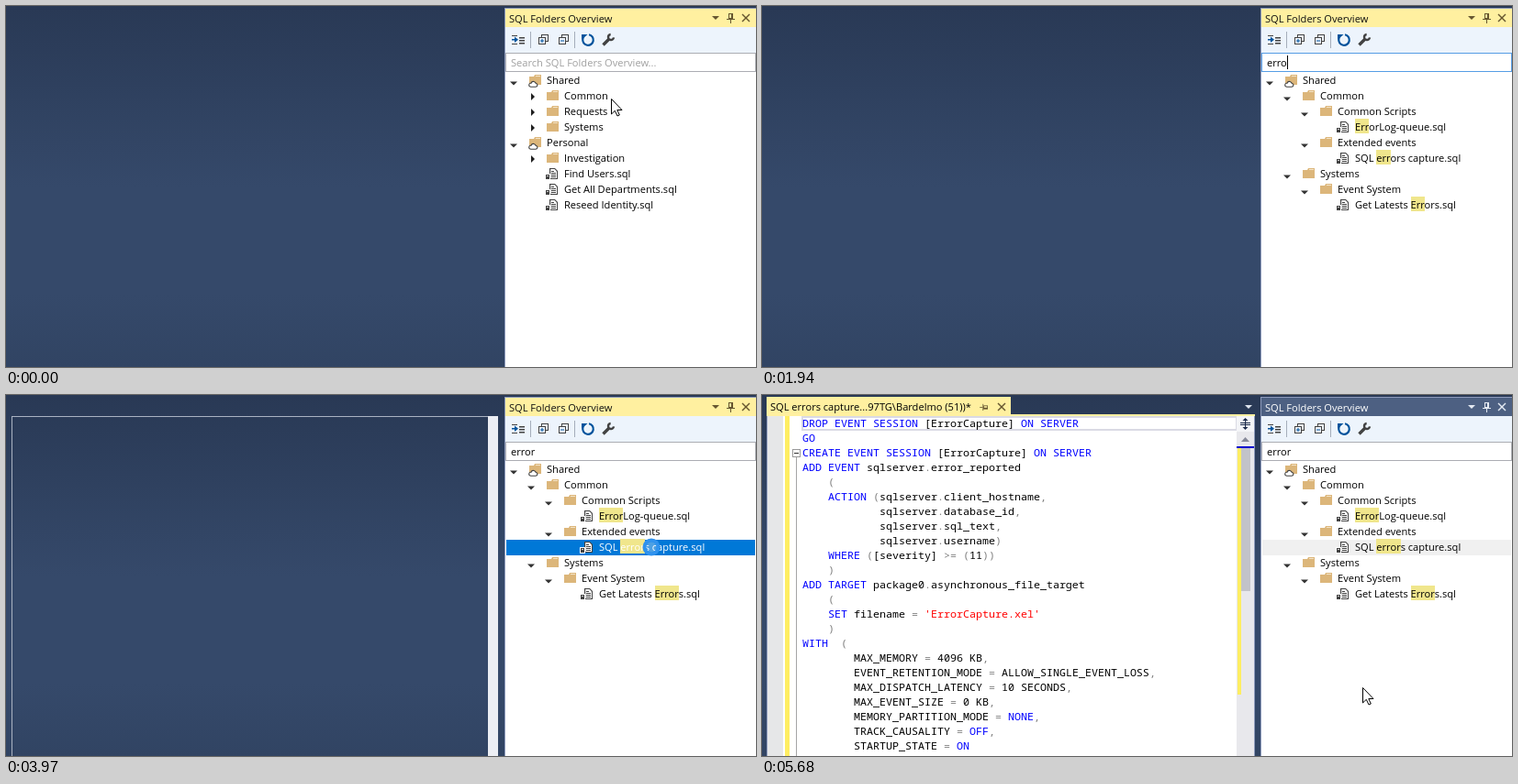
An HTML page with a canvas for the animation above (5.76 s loop, 817 px wide and 394 px high).

```html
<!DOCTYPE html>
<html lang="en">
<head>
<meta charset="utf-8">
<title>Script tree search</title>
<style>
html, body { margin: 0; width: 100%; height: 100%; overflow: hidden; background: #35496a; }
canvas { display: block; }
</style>
</head>
<body>
<canvas id="stage" width="817" height="394"></canvas>
<script>
const W = 817, H = 394, LOOP = 5760;
const g = document.getElementById('stage').getContext('2d');
const UI = '11.1px "Open Sans", "Noto Sans", sans-serif';
const MONO = '11.667px "Noto Sans Mono", "DejaVu Sans Mono", monospace';
const YELLOW = '#fff0a0', DARK = '#424242', KHAKI = '#f0e68c', BORDER = '#8e9bbc';
const NAME = 'SQL Folders Overview';

// Tree rows: level, kind (c cloud folder, o open folder, f closed folder, s script), label
const fullTree = [
  [0, 'c', 'Shared'], [1, 'f', 'Common'], [1, 'f', 'Requests'], [1, 'f', 'Systems'],
  [0, 'c', 'Personal'], [1, 'f', 'Investigation'], [1, 's', 'Find Users.sql'],
  [1, 's', 'Get All Departments.sql'], [1, 's', 'Reseed Identity.sql']
];
const foundTree = [
  [0, 'c', 'Shared'], [1, 'o', 'Common'], [2, 'o', 'Common Scripts'],
  [3, 's', 'ErrorLog-queue.sql'], [2, 'o', 'Extended events'],
  [3, 's', 'SQL errors capture.sql'], [1, 'o', 'Systems'],
  [2, 'o', 'Event System'], [3, 's', 'Get Latests Errors.sql']
];
const PICKED = 5;

const code = `DROP EVENT SESSION [ErrorCapture] ON SERVER
GO
CREATE EVENT SESSION [ErrorCapture] ON SERVER
ADD EVENT sqlserver.error_reported
    (
    ACTION (sqlserver.client_hostname,
            sqlserver.database_id,
            sqlserver.sql_text,
            sqlserver.username)
    WHERE ([severity] >= (11))
    )
ADD TARGET package0.asynchronous_file_target
    (
    SET filename = 'ErrorCapture.xel'
    )
WITH  (
        MAX_MEMORY = 4096 KB,
        EVENT_RETENTION_MODE = ALLOW_SINGLE_EVENT_LOSS,
        MAX_DISPATCH_LATENCY = 10 SECONDS,
        MAX_EVENT_SIZE = 0 KB,
        MEMORY_PARTITION_MODE = NONE,
        TRACK_CAUSALITY = OFF,
        STARTUP_STATE = ON`.split('\n');
const keyword = /^(DROP|EVENT|SESSION|ON|OFF|NONE|SERVER|GO|CREATE|ADD|ACTION|WHERE|TARGET|SET|WITH)$/;

const typed = [[1480, 'e'], [1620, 'er'], [1870, 'err'], [1940, 'erro'], [2110, 'error']];
const marked = [[1620, 'e'], [1870, 'er'], [1940, 'err'], [2110, 'erro'], [2190, 'error']];

// Pointer moves: start, end, target x, target y
const moves = [
  [80, 230, 623, 61], [2810, 3270, 694, 187], [3340, 3420, 703, 167],
  [4290, 4440, 634, 167], [4580, 4970, 430, 120], [5350, 5680, 654, 319]
];

const within = (t, a, b) => t >= a && t < b;
const latest = (list, t) => list.reduce((v, [at, s]) => t >= at ? s : v, '');

function rect(x, y, w, h, c) { g.fillStyle = c; g.fillRect(x, y, w, h); }

function frame(x, y, w, h, c, t = 1) {
  g.strokeStyle = c; g.lineWidth = t;
  g.strokeRect(x + t / 2, y + t / 2, w - t, h - t);
}

function text(s, x, y, c, font = UI) {
  g.font = font; g.fillStyle = c;
  g.fillText(s, x, y);
}

function width(s) { g.font = UI; return g.measureText(s).width; }

function trace(points, close) {
  g.beginPath();
  points.forEach(([x, y]) => g.lineTo(x, y));
  if (close) g.closePath();
}

function fill(points, c) { trace(points, true); g.fillStyle = c; g.fill(); }

function line(points, c, w = 1) {
  trace(points); g.strokeStyle = c; g.lineWidth = w; g.stroke();
}

function arc(x, y, r, a, b, c, w) {
  g.beginPath(); g.arc(x, y, r, a, b);
  g.strokeStyle = c; g.lineWidth = w; g.stroke();
}

function down(x, y, r, c) { fill([[x - r, y], [x + r, y], [x, y + r]], c); }

function cross(x, y, c) {
  line([[x - 4, y - 4], [x + 4, y + 4]], c, 1.4);
  line([[x + 4, y - 4], [x - 4, y + 4]], c, 1.4);
}

function pin(x, y, c, flat) {
  g.save();
  g.translate(x, y);
  if (flat) g.rotate(Math.PI / 2);
  const s = flat ? .8 : 1;
  g.scale(s, s);
  frame(-2, -5, 5, 6, c);
  rect(1, -5, 2, 6, c);
  rect(-4, 1, 9, 1, c);
  rect(0, 2, 1, 4, c);
  g.restore();
}

function backdrop() {
  const b = g.createLinearGradient(0, 0, 0, H);
  b.addColorStop(0, '#293955');
  b.addColorStop(.5, '#35496a');
  b.addColorStop(.8, '#35496a');
  b.addColorStop(1, '#314463');
  g.fillStyle = b;
  g.fillRect(0, 0, W, H);
}

function stackIcon(x, plus) {
  frame(x + 4, 31, 8, 8, DARK);
  rect(x + 1, 34, 8, 8, '#edf4fc');
  frame(x + 1, 34, 8, 8, DARK);
  rect(x + 3, 37.5, 4, 1, '#00539c');
  if (plus) rect(x + 4.5, 36, 1, 4, '#00539c');
}

function toolbar() {
  rect(544, 23, 273, 28, '#edf4fc');
  rect(551, 32, 6, 1, DARK);
  rect(551, 41, 6, 1, DARK);
  rect(559, 34, 6, 1.5, DARK);
  rect(559, 37, 6, 1.5, DARK);
  rect(559, 40, 6, 1.5, DARK);
  rect(551, 36, 5, 1.5, '#00539c');
  fill([[554, 33.5], [558, 36.8], [554, 40]], '#00539c');
  rect(571, 28, 1, 18, '#a5adbb');
  stackIcon(579, true);
  stackIcon(601, false);
  rect(619, 28, 1, 18, '#a5adbb');
  arc(634, 37, 5.8, -1.4, 3.7, '#00539c', 2.2);
  fill([[627, 31], [633.5, 31], [627, 37]], '#00539c');
  line([[650.5, 42.5], [657, 36]], DARK, 3.4);
  arc(659, 34, 3, .1, 4.6, DARK, 2.4);
}

function header(active) {
  const c = active ? '#665630' : '#e4e9f2';
  rect(543, 2, 274, H, BORDER);
  rect(544, 3, 273, 20, active ? YELLOW : '#4d6082');
  text(NAME, 548, 18, active ? '#111' : '#fff');
  down(773, 11, 4, c);
  pin(789, 13, c);
  cross(806, 13, c);
}

function searchBox(t) {
  const hover = within(t, 230, 630), focus = within(t, 630, 3660);
  const word = latest(typed, t);
  rect(544, 51, 273, 21, '#fff');
  frame(544, 51, 273, 21, focus ? '#569de5' : hover ? '#7eb4ea' : '#abadb3');
  if (word) text(word, 550, 66, '#000');
  else text('Search ' + NAME + '...', 550, 66, '#a0a0a0');
  if (within(t, 630, 1240) || within(t, 1480, 2730) || within(t, 3270, 3660))
    rect(Math.round(550 + width(word)), 54, 1, 15, '#000');
}

function folder(x, y) {
  fill([[x, y - 4], [x + 5, y - 4], [x + 6, y - 6], [x + 13, y - 6],
    [x + 13, y + 5], [x, y + 5]], '#dcb67a');
  rect(x + 7, y - 5, 5, 1, '#f3e3c6');
}

function cloud(x, y) {
  g.beginPath();
  g.arc(x + 2.7, y + 5.2, 2, 1.57, 4.4);
  g.arc(x + 5.5, y + 3.9, 2.5, 3.4, 5.9);
  g.arc(x + 8, y + 5.3, 1.9, 4.9, 1.57);
  g.closePath();
  g.fillStyle = '#fff'; g.fill();
  g.strokeStyle = DARK; g.lineWidth = 1.1; g.stroke();
}

function script(x, y) {
  fill([[x + 4, y - 6], [x + 10, y - 6], [x + 13, y - 3], [x + 13, y + 6], [x + 4, y + 6]], DARK);
  fill([[x + 5.2, y - 5], [x + 9.5, y - 5], [x + 12, y - 2.5], [x + 12, y + 5], [x + 5.2, y + 5]], '#fff');
  for (let i = 0; i < 4; i++) rect(x + 6, y - 3 + i * 2, i ? 5 : 3, 1, DARK);
  rect(x - 1, y, 6, 7, '#fff');
  rect(x, y + 1, 4, 5, DARK);
  rect(x + 1, y + 2, 2, 1, '#ccc');
}

function treeRow([level, kind, label], i, mark, pick) {
  const y = 81 + 17 * i, x = 589 + 19 * level;
  if (pick) rect(545, y - 8, 271, 17, pick);
  if (kind === 'f') fill([[x - 36, y - 3], [x - 32, y + 1], [x - 36, y + 5]], '#1e1e1e');
  else if (kind !== 's') down(x - 36, y + 1.5, 4, '#333');
  if (kind === 's') script(x - 20, y);
  else folder(x - 19, y);
  if (kind === 'c') cloud(x - 20, y);
  const at = mark ? label.toLowerCase().indexOf(mark) : -1;
  if (at >= 0) {
    const left = Math.round(x + width(label.slice(0, at)));
    const right = Math.round(x + width(label.slice(0, at + mark.length)));
    rect(left, y - 9, right - left, 16, KHAKI);
  }
  text(label, x, y + 4, pick === '#0078d7' ? '#fff' : '#000');
}

function explorer(t) {
  header(t < 4050);
  toolbar();
  rect(544, 72, 273, H - 72, '#fff');
  searchBox(t);
  const mark = latest(marked, t);
  const pick = t < 3660 ? '' : t < 4050 ? '#0078d7' : '#f0f0f0';
  (t < 1620 ? fullTree : foundTree).forEach((row, i) =>
    treeRow(row, i, mark, i === PICKED ? pick : ''));
}

function codeLine(s, y) {
  for (const m of s.matchAll(/'[^']*'|\[\w+\]|\w+|\S/g)) {
    const w = m[0];
    const c = w[0] === "'" ? '#f00' : keyword.test(w) ? '#00f' :
      /^[(),.=>]$/.test(w) ? '#808080' : '#000';
    text(w, 44 + 7 * m.index, y, c, MONO);
  }
}

function editor(t) {
  if (t < 3970) return;
  if (t < 4050) {
    rect(6, 23, 520, 1, '#aab3c2');
    rect(6, 23, 1, H, '#aab3c2');
    rect(525, 23, 11, H, '#eceef4');
    return;
  }
  const loaded = t >= 4120;
  const end = loaded ? 271 : 167;
  rect(5, 2, end - 5, 20, YELLOW);
  rect(5, 21, 532, 2, YELLOW);
  text(loaded ? 'SQL errors capture...97TG\\Bardelmo (51))*' : 'SQL errors capture.sql', 9, 17, '#000');
  pin(end - 29, 13, '#665630', true);
  cross(end - 10, 13, '#665630');
  down(530, 11, 4, '#dfe5ee');

  rect(5, 23, 532, H, BORDER);
  rect(6, 23, 530, H, '#fff');
  rect(6, 23, 17, H, '#e6e7e8');
  frame(43, 23, 475, 16, '#dadae4', 2);
  rect(517, 23, 19, H, '#e8e8ec');
  rect(517, 23, 19, 17, '#f4f5f8');
  rect(521, 30, 11, 1, '#1b2a4a');
  rect(521, 32, 11, 1, '#1b2a4a');
  rect(526, 26, 1, 11, '#1b2a4a');
  fill([[523.5, 28], [526.5, 25], [529.5, 28]], '#1b2a4a');
  down(526.5, 35, 3, '#1b2a4a');
  fill([[522, 51], [526.5, 46], [531, 51]], '#868999');
  rect(522, 58, 10, loaded ? 156 : H, '#c2c3c9');
  if (loaded) {
    rect(25, 23, 5, H, '#ffee62');
    rect(518, 57, 4, 270, '#ffee62');
    code.forEach((s, i) => codeLine(s, 35 + 16 * i));
  }
  rect(517, 56, 19, 2, '#0000cd');
  if (t >= 5430) {
    rect(37, 68, 1, H, '#a5a5a5');
    rect(33, 59, 9, 9, '#fff');
    frame(33, 59, 9, 9, '#999');
    rect(35, 63, 5, 1, '#333');
  }
  if (t < 4580 || within(t, 5120, 5650)) rect(44, 23, 1, 15, '#000');
}

function pointerAt(t) {
  let x = 659, y = 101;
  for (const [a, b, tx, ty] of moves) {
    if (t < a) break;
    const gaps = Math.round((b - a) / 77);
    const k = Math.min(1, (Math.floor((t - a) / (b - a) * gaps + 1e-6) + 1) / (gaps + 1));
    x += (tx - x) * k;
    y += (ty - y) * k;
  }
  return [Math.round(x), Math.round(y)];
}

function pointer(t) {
  if (within(t, 1480, 2810)) return;
  const [x, y] = pointerAt(t);
  if (within(t, 630, 780) || within(t, 3740, 4120)) {
    g.beginPath(); g.arc(x, y - 1, 6, 0, 7);
    g.fillStyle = 'rgba(255,255,255,.3)'; g.fill();
    arc(x, y - 1, 7.5, 0, 7, '#2f92ee', 4);
  } else if (x < 517 || within(y, 52, 72)) {
    rect(x, y - 7, 1, 15, '#000');
    rect(x - 3, y - 8, 7, 1, '#000');
    rect(x - 3, y + 8, 7, 1, '#000');
  } else {
    const shape = [[0, 0], [0, 16.5], [3.8, 12.8], [6.5, 18.5], [8.8, 17.5],
      [6.3, 12], [11.5, 12]].map(([u, v]) => [x + .5 + u, y + .5 + v]);
    fill(shape, '#fff');
    trace(shape, true);
    g.strokeStyle = '#000'; g.lineWidth = 1; g.stroke();
  }
}

function draw(t) {
  backdrop();
  editor(t);
  explorer(t);
  pointer(t);
}

const start = performance.now();
function tick() {
  draw((performance.now() - start) % LOOP);
  requestAnimationFrame(tick);
}
tick();
</script>
</body>
</html>
```
